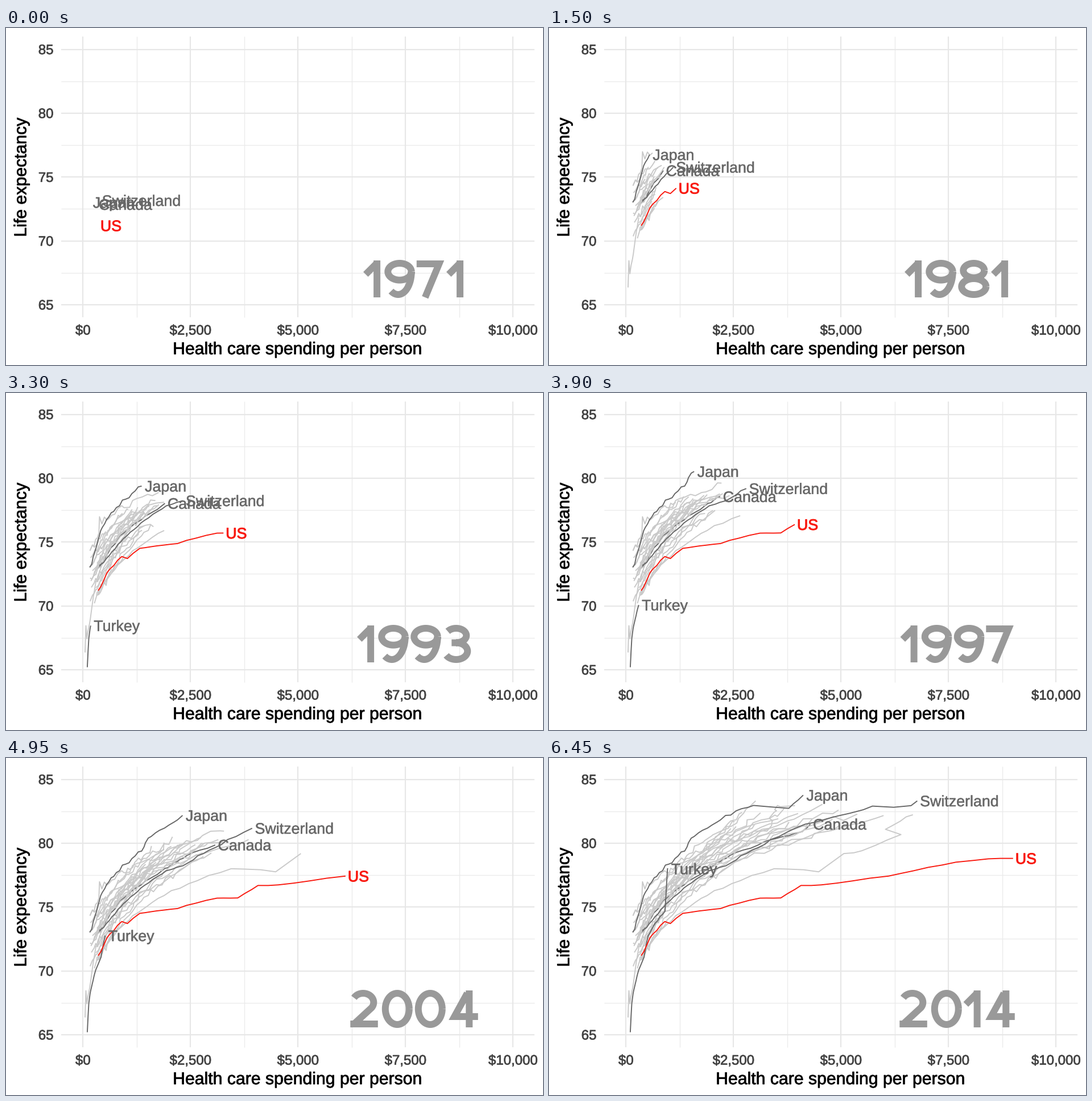
Write a matplotlib script that moves like this. It is 944 px wide and 593 px high and loops after 8 s.

```python
import numpy as np
import matplotlib.pyplot as plt
from matplotlib.animation import FuncAnimation
from matplotlib.patches import PathPatch
from matplotlib.path import Path
from matplotlib.textpath import TextPath
from matplotlib.transforms import Affine2D

W, H, DPI = 944, 593, 64
PX = 72 / DPI  # points per pixel
FIRST, LAST = 1971, 2014
STEP, INTERVAL, LOOP = 150, 50, 8000
RED, DARK, PALE, YEAR_GREY = "#f9180e", "#666666", "#c9c9c9", "#999999"

plt.rcParams["font.family"] = "Liberation Sans"
rng = np.random.default_rng(7)

fig = plt.figure(figsize=(W / DPI, H / DPI), dpi=DPI, facecolor="white")
ax = fig.add_axes([0, 0, 1, 1])
ax.set(xlim=(0, W), ylim=(0, H))
ax.axis("off")


def to_x(spend):
    return 135 + 0.0756 * np.asarray(spend)


def to_y(life):
    return H - 37.5 - (85 - np.asarray(life)) * 22.47


# ---------- text ----------
def add_text(s, x, y, size, color, align=0.5, angle=0, weight=0.8, z=2):
    """Text on a baseline, aligned by its ink: 0 left, 0.5 centre, 1 right."""
    path = TextPath((0, 0), s, size=size)
    box = path.get_extents()
    path = path.transformed(Affine2D().translate(-box.x0 - align * box.width, 0))
    move = Affine2D().rotate_deg(angle).translate(x, y)
    return ax.add_patch(PathPatch(path, fc=color, ec=color, lw=weight * PX, zorder=z,
                                  transform=move + ax.transData))


# ---------- grid and axes ----------
def grid(xs, ys, color, width):
    ax.vlines(xs, H - 509, H - 15, color=color, lw=width * PX, zorder=0)
    ax.hlines(ys, 97, 929, color=color, lw=width * PX, zorder=0)


grid(to_x(np.arange(1250, 10000, 2500)), to_y(np.arange(67.5, 85, 5)), "#ebebeb", 1.4)
grid(to_x(np.arange(0, 10001, 2500)), to_y(np.arange(65, 86, 5)), "#e7e7e7", 2.1)
for spend in range(0, 10001, 2500):
    add_text(f"${spend:,}", to_x(spend), H - 539.5, 24, "#404040")
for life in range(65, 86, 5):
    add_text(str(life), 82.5, to_y(life) - 8.5, 24, "#404040", align=1)
add_text("Health care spending per person", 512.5, H - 574, 30.2, "black")
add_text("Life expectancy", 35.5, H - 261.5, 30.2, "black", angle=90)


# ---------- big year numerals, built from strokes ----------
def arc(cx, cy, rx, ry, start=0, end=360):
    a = np.radians(np.linspace(start, end, 60))
    return np.column_stack([cx + rx * np.cos(a), cy + ry * np.sin(a)])


NINE = [arc(28.7, 45.2, 20.7, 14.8), arc(26, 45, 23.4, 40, 0, -122)]

# advance and strokes
NUMERALS = {
    "0": (58, [arc(29, 32.5, 21, 27.5)]),
    "1": (36, [[(5, 40.5), (23, 58.5)], [(24.8, 0), (24.8, 65)]]),
    "2": (55, [np.vstack([arc(24, 44, 18.5, 16, 150, -36), [(8, 6)]]), [(1.5, 6), (50, 6)]]),
    "3": (54, [arc(25, 47.3, 18, 12.7, 145, -90), arc(25, 19.8, 20, 14.8, 90, -150),
               [(17, 34.5), (26, 34.5)]]),
    "4": (58, [[(39.5, 0), (39.5, 65)], [(55, 19), (13.5, 19), (36, 60)]]),
    "5": (56, [[(47, 59), (16, 59), (14, 32)], arc(27, 22.5, 19, 17.3, 135, -150)]),
    "6": (57, [(57.4, 65) - stroke for stroke in NINE]),
    "7": (53, [[(1.5, 59), (41, 59), (16.5, 0)]]),
    "8": (59, [arc(29.5, 47.3, 18.5, 12.7), arc(29.5, 19, 21.5, 14)]),
    "9": (57, NINE),
}


def year_path(year):
    digits = [NUMERALS[d] for d in str(year)]
    x = 718.3 - sum(advance for advance, _ in digits) / 2
    paths = []
    for advance, strokes in digits:
        paths += [Path(np.add(stroke, (x, H - 474))) for stroke in strokes]
        x += advance
    return Path.make_compound_path(*paths)


year_art = ax.add_patch(PathPatch(year_path(FIRST), fc="none", ec=YEAR_GREY, lw=12 * PX,
                                  capstyle="butt", joinstyle="miter", zorder=1))


# ---------- countries ----------
def pace(years):
    """Spending grows fast at first, then slower."""
    return ((np.asarray(years) - FIRST) / (LAST - FIRST)) ** 0.67


class Country:
    """A line through (year, spending, life expectancy) key points."""

    def __init__(self, *points, color=PALE, z=3, name=None, wobble=0.13):
        keys, spend, life = np.transpose(points)
        self.start = int(keys[0])
        years = np.arange(self.start, LAST + 1)
        drift, noise = rng.normal(size=(2, len(years))) * wobble
        spend = np.exp(np.interp(pace(years), pace(keys), np.log(spend)) + 0.1 * drift)
        self.x = to_x(spend)
        self.y = to_y(np.interp(years, keys, life) + noise)
        self.line, = ax.plot([], [], color=color, lw=1.9 * PX, zorder=z,
                             solid_joinstyle="round", solid_capstyle="butt")
        self.label = name and add_text(name, 0, 0, 26.8, color, align=0, z=8,
                                       weight=1 if color == RED else 0.6)

    def show(self, year):
        n = max(0, year - self.start + 1)
        self.line.set_data(self.x[:n], self.y[:n])
        if self.label:
            self.label.set_visible(n > 0)
            move = Affine2D().translate(self.x[n - 1] + 6, self.y[n - 1] - 9.5)
            self.label.set_transform(move + ax.transData)


# Background lines fan out from a common cluster.
countries = [
    Country((FIRST, rng.uniform(150, 340), 70.4 + 4 * (0.618 * i % 1)),
            (LAST, end, 81 + 1.8 * (0.414 * i % 1)))
    for i, end in enumerate(np.linspace(2400, 5300, 17))
]
countries += [
    Country((1971, 165, 74.4), (2004, 3850, 80.0), (2014, 6080, 82.2)),
    Country((1971, 170, 71.9), (2004, 2110, 80.3), (2014, 3040, 83.3)),
    Country((1971, 170, 74.4), (1976, 380, 75.6), (1977, 395, 77.1), (1978, 450, 76.5),
            (1993, 1740, 78.9), (2004, 3340, 81.1), (2012, 3520, 83.0), (2014, 3900, 82.9)),
    Country((1971, 52, 66.4), (1972, 72, 68.4), (1973, 95, 67.5), (1975, 155, 68.5),
            (1981, 300, 71.8), (2014, 2560, 81.2), wobble=0.06),
    Country((1975, 340, 70.9), (1993, 1890, 75.9), (2000, 3455, 78.0), (2003, 4480, 77.8),
            (2004, 5050, 79.2), (2006, 5500, 79.4), (2009, 6400, 80.7), (2010, 6040, 81.1),
            (2014, 6680, 82.3), wobble=0.04),
]

countries += [
    Country((1971, 310, 72.8), (1981, 873, 75.5), (1988, 1455, 77.0), (1993, 1918, 78.0),
            (2000, 2420, 79.0), (2004, 3070, 79.9), (2011, 4100, 80.9), (2014, 4260, 81.45),
            name="Canada", color=DARK, z=2.5, wobble=0.04),
    Country((1971, 160, 72.9), (1979, 455, 76.2), (1988, 1000, 78.4), (1993, 1365, 79.4),
            (1996, 1505, 80.3), (2000, 1905, 81.2), (2004, 2320, 82.1), (2009, 3000, 83.0),
            (2011, 3790, 82.7), (2014, 4160, 83.7), name="Japan", color=DARK, z=4, wobble=0.06),
    Country((1971, 384, 73.2), (1981, 1111, 75.8), (1988, 1720, 77.4), (1993, 2328, 78.3),
            (2000, 3215, 79.9), (2004, 3930, 81.2), (2008, 4930, 82.2), (2011, 5780, 82.8),
            (2013, 6640, 82.9), (2014, 6785, 83.3), name="Switzerland", color=DARK, z=4,
            wobble=0.04),
    Country((1988, 105, 65.2), (1990, 140, 67.5), (1993, 185, 68.5), (2000, 425, 71.1),
            (2004, 515, 72.7), (2012, 915, 74.7), (2013, 970, 78.0), (2014, 990, 78.0),
            name="Turkey", color=DARK, z=4, wobble=0.04),
    Country((1971, 357, 71.2), (1975, 560, 72.6), (1979, 908, 73.9), (1980, 1036, 73.7),
            (1982, 1329, 74.5), (1988, 2202, 74.9), (1992, 3122, 75.7), (1995, 3598, 75.7),
            (1998, 4087, 76.7), (2000, 4551, 76.7), (2004, 6100, 77.4), (2009, 7685, 78.5),
            (2012, 8413, 78.8), (2014, 9020, 78.8), name="US", color=RED, z=5, wobble=0.02),
]


def update(frame):
    year = min(LAST, FIRST + frame * INTERVAL // STEP)
    year_art.set_path(year_path(year))
    for country in countries:
        country.show(year)
    return []


animation = FuncAnimation(fig, update, frames=LOOP // INTERVAL, interval=INTERVAL,
                          repeat=True, repeat_delay=0)
plt.show()
```
